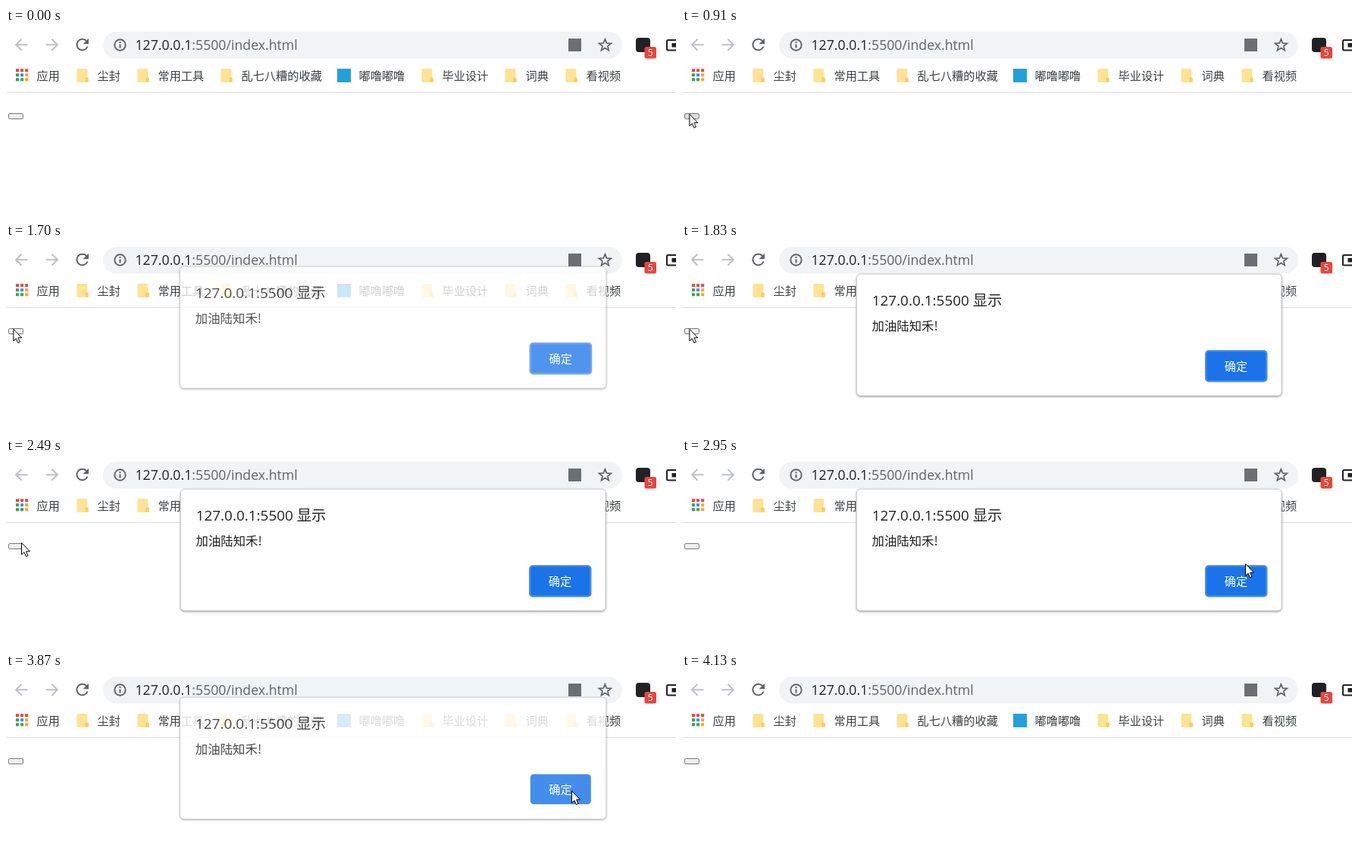
An HTML page that plays this animation: 884x248 px, repeating every 4.46 s.

```html
<!DOCTYPE html>
<html lang="zh-CN">
<head>
<meta charset="utf-8">
<title>index.html</title>
<style>
html, body { margin: 0; width: 100%; height: 100%; overflow: hidden; background: #fff; }
svg { display: block; width: 884px; height: 248px; }
text { font-family: "Open Sans", "Noto Sans CJK SC", "Noto Sans CJK", sans-serif; white-space: pre; }
.cjk { font-family: "Noto Sans CJK SC", "Noto Sans CJK", sans-serif; }
.marks text { font-size: 15.2px; fill: #3c4043; }
.line { fill: none; stroke: #5f6368; stroke-width: 2; }
#panel { filter: drop-shadow(0 1.2px 1.8px rgba(0,0,0,.42)); }
</style>
</head>
<body>
<svg viewBox="0 0 884 248">
  <defs>
    <g id="folder">
      <rect x=".5" width="13.8" height="18" rx="1.5" fill="#ffe293"/>
      <path d="M12 11.5h2.5q1.5 0 1.5 1.5v4q0 1-1 1h-3z" fill="#f9d271"/>
      <path d="M12.2 12v5" stroke="#e9b949" stroke-width=".8"/>
    </g>
  </defs>
  <rect width="884" height="248" fill="#fff"/>

  <!-- toolbar -->
  <g class="line">
    <path d="M28.5 22.3H13.5M20.6 14.8 13.1 22.3 20.6 29.8" stroke="#bdc1c6"/>
    <path d="M52.5 22.3H67.5M60.4 14.8 67.9 22.3 60.4 29.8" stroke="#bdc1c6"/>
    <path d="M106.3 17.2A7.3 7.3 0 1 0 107.6 24.5"/>
  </g>
  <path d="M109 13.8V21.2H101.6Z" fill="#5f6368"/>
  <rect x="128" y="5" width="685" height="35.5" rx="17.7" fill="#f1f3f4"/>
  <circle cx="150.5" cy="22.5" r="7.2" class="line" style="stroke-width:1.9"/>
  <path d="M150.5 18v2M150.5 21.6v5" class="line"/>
  <text x="170.5" y="28.7" font-size="17.7" fill="#5f6368"><tspan fill="#202124">127.0.0.1</tspan>:5500/index.html</text>
  <rect x="742" y="14" width="17" height="17" fill="#6b6f74"/>
  <path id="star" class="line" style="stroke-width:1.7"/>
  <rect x="831" y="13" width="19" height="19" rx="4" fill="#202124"/>
  <rect x="842.5" y="25" width="15.5" height="15.5" rx="2.5" fill="#e8453c"/>
  <text x="850.2" y="37.3" font-size="12" fill="#fff" text-anchor="middle">5</text>
  <rect x="872" y="16" width="20" height="13.5" rx="1.5" fill="none" stroke="#202124" stroke-width="2"/>
  <rect x="878.5" y="20" width="8" height="5.5" fill="#202124"/>

  <g class="marks" id="marks"></g>
  <rect y="85" width="884" height="1" fill="#dadce0"/>

  <rect id="pageButton" x="3.5" y="113.5" width="19" height="7" rx="1.7" stroke="#767676"/>

  <g id="dialog">
    <rect id="panel" x="230.5" y="41.3" width="560.5" height="161.2" rx="5" fill="#fff" stroke="#c4c4c4" stroke-width=".7"/>
    <text x="250.7" y="83" font-size="18.9" fill="#202124">127.0.0.1:5500 <tspan class="cjk" font-size="19.3">显示</tspan></text>
    <text class="cjk" x="250.5" y="116.3" font-size="16.4" fill="#202124">加油陆知禾!</text>
    <rect id="ring" x="690" y="142" width="82.5" height="42.5" rx="5" fill="#4a8cec"/>
    <rect id="ok" fill="#1a73e8"/>
    <text class="cjk" x="731" y="169.2" font-size="15.2" fill="#fff" text-anchor="middle">确定</text>
  </g>

  <path id="cursor" d="M.5.5V16.2L4 12.9 6.4 18.6 9 17.5 6.6 11.9H11.5Z" fill="#fff" stroke="#000" stroke-width="1" stroke-linejoin="round"/>
</svg>
<script>
const LOOP = 4460, STEP = 65;
const $ = id => document.getElementById(id);
const set = (el, attrs) => { for (const k in attrs) el.setAttribute(k, attrs[k]); };
function add(parent, tag, attrs, label) {
  const el = document.createElementNS('http://www.w3.org/2000/svg', tag);
  set(el, attrs);
  if (label) el.textContent = label;
  parent.appendChild(el);
}

function drawStar() {
  let d = '';
  for (let i = 0; i < 10; i++) {
    const r = i % 2 ? 3.6 : 8.3, a = i * Math.PI / 5 - Math.PI / 2;
    d += (i ? 'L' : 'M') + (790.4 + r * Math.cos(a)).toFixed(2) + ' ' + (23 + r * Math.sin(a)).toFixed(2);
  }
  set($('star'), { d: d + 'Z' });
}

function drawBookmarks() {
  const bar = $('marks');
  const [r, g, b, y] = ['#e8453c', '#34a058', '#4285f4', '#f5a623'];
  [r, r, r, g, b, y, g, g, y].forEach((fill, i) =>
    add(bar, 'rect', { x: 13 + i % 3 * 6.1, y: 54.2 + Math.floor(i / 3) * 6.1, width: 4, height: 4, fill }));
  add(bar, 'text', { x: 40.5, y: 69, class: 'cjk' }, '应用');
  const items = [[93, '尘封'], [173, '常用工具'], [283, '乱七八糟的收藏'], [438, '嘟噜嘟噜'],
    [548, '毕业设计'], [658, '词典'], [738, '看视频']];
  for (const [x, label] of items) {
    if (x === 438) add(bar, 'rect', { x: 437, y: 54, width: 18, height: 18, fill: '#23a0dc' });
    else add(bar, 'use', { href: '#folder', x, y: 54 });
    add(bar, 'text', { x: x + 27.5, y: 69, class: 'cjk' }, label);
  }
}

// Stepped tracks: start time, then one pose per step; the last pose holds.
const pointer = [
  [0, [null]],
  [520, [[623, 236], [535, 192], [345, 150], [160, 128], [55, 118], [17, 115], [9.4, 113.8]]],
  [2490, [[20, 112], [85, 108], [220, 109], [390, 113], [550, 119], [665, 126], [720, 133], [743, 140], [746, 154]]],
  [3080, [[746, 155], [746, 155], [746, 156]]],
  [3935, [[748, 160], [768, 188], [811, 236], null]]
];
// Vertical offset and opacity.
const popup = [
  [0, [null]],
  [1570, [[-20, .2], [-15, .5], [-10, .76], [-4, .94], [0, 1]]],
  [3740, [[-1, .98], [-5, .91], [-9, .81], [-14, .52], [-19, .2], null]]
];
function pose(track, t) {
  const [start, list] = track.filter(part => part[0] <= t).pop();
  return list[Math.min(list.length - 1, Math.floor((t - start) / STEP))];
}

function place(el, p, transform, opacity = 1) {
  el.style.display = p ? '' : 'none';
  if (p) set(el, { transform, opacity });
}

function render(t) {
  const p = pose(pointer, t), d = pose(popup, t);
  place($('cursor'), p, p && `translate(${p[0]} ${p[1]})`);
  const stretch = d && 1 - d[0] * .0003;
  place($('dialog'), d, d && `translate(510.75 ${d[0]}) scale(${stretch} 1) translate(-510.75 0)`, d && d[1]);
  const focused = t < 3740;
  $('ring').style.display = focused ? '' : 'none';
  set($('ok'), focused
    ? { x: 692.3, y: 144.3, width: 77.9, height: 37.9, rx: 3 }
    : { x: 691.3, y: 143.2, width: 79.8, height: 39.8, rx: 4.5 });
  const hover = t >= 845 && t < 1570;
  set($('pageButton'), { fill: hover ? '#dcdcdc' : '#f0f0f0' });
}

function tick() {
  render(performance.now() % LOOP);
  requestAnimationFrame(tick);
}
drawStar();
drawBookmarks();
tick();
</script>
</body>
</html>
```
